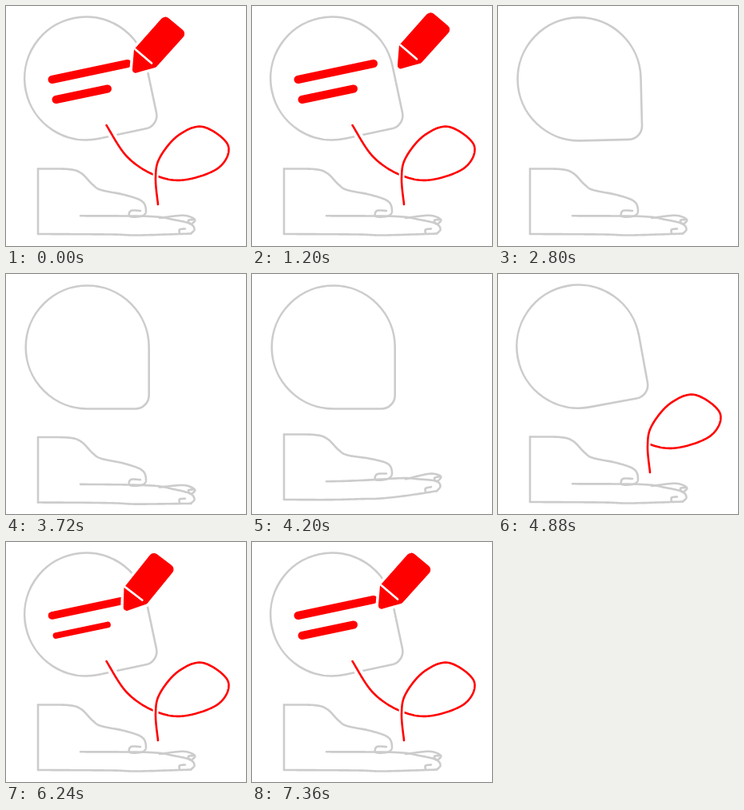
An HTML page with a canvas for the animation above (7400 ms loop, 300 by 300 pixels).

```html
<!DOCTYPE html>
<html lang="en">
<head>
<meta charset="utf-8">
<title>Balloon note</title>
<style>
html, body { margin: 0; width: 100%; height: 100%; overflow: hidden; background: #fff; }
canvas { display: block; width: 300px; height: 300px; }
</style>
</head>
<body>
<canvas id="stage"></canvas>
<script>
const LOOP = 7400, GRAY = '#ccc', RED = '#f00';
const stage = document.getElementById('stage');
const c = stage.getContext('2d');
const dpr = window.devicePixelRatio || 1;
stage.width = stage.height = 300 * dpr;

const span = (t, a, b) => Math.min(1, Math.max(0, (t - a) / (b - a)));
const smooth = p => p * p * (3 - 2 * p);
const easeOut = p => 1 - (1 - p) ** 3;
const inOut = p => p < .5 ? 4 * p ** 3 : 1 - 4 * (1 - p) ** 3;
const hump = p => Math.sin(Math.PI * p);
const mix = (a, b, p) => a.map((v, i) => v + (b[i] - v) * p);

// Smooth curve through the given points (Catmull-Rom), sampled evenly.
const STEPS = 24;
function spline(points) {
  const at = i => points[Math.min(points.length - 1, Math.max(0, i))];
  return Array.from({ length: (points.length - 1) * STEPS + 1 }, (_, n) => {
    const i = Math.floor(n / STEPS), p = n % STEPS / STEPS;
    return [0, 1].map(k => {
      const [a, b, d, e] = [-1, 0, 1, 2].map(o => at(i + o)[k]);
      return b + p / 2 * (d - a + p * (2 * a - 5 * b + 4 * d - e + p * (3 * (b - d) + e - a)));
    });
  });
}

function trace(points) {
  c.beginPath();
  points.forEach(p => c.lineTo(...p));
}

function stroke(color, width, path) {
  c.strokeStyle = color;
  c.lineWidth = width;
  path ? c.stroke(path) : c.stroke();
}

function drawBubble(t) {
  const turn = inOut(span(t, 4380, 5120)) + 1 - inOut(span(t, 2180, 3080));
  c.save();
  c.translate(101.7 - 1.5 * turn, 91.5 - turn);
  c.rotate(-12 * turn * Math.PI / 180);
  c.beginPath();
  c.roundRect(-77, -77, 154, 154, [77, 77, 17, 77]);
  stroke(GRAY, 2.6);
  c.restore();
}

// The pencil starts at WRITE and takes one BEAT for every move.
const WRITE = 5560, BEAT = 136;
const lines = [
  { from: [57.5, 92], to: [152, 72], start: WRITE + BEAT, erase: LOOP + 1500 },
  { from: [62.5, 117], to: [127, 103.5], start: WRITE + 3 * BEAT, erase: LOOP + 1310 }
];

function drawLine({ from, to, start, erase }, u) {
  const part = span(u, start, start + BEAT) - span(u, erase, erase + 200);
  if (part <= 0) return;
  trace([from, mix(from, to, part)]);
  stroke(RED, 6 + 4 * span(u, start, start + 600));
}

const cord = spline([[125.5, 149], [151, 188], [185, 211], [222, 217.5], [266, 202],
  [277.5, 174], [246, 151], [215, 162], [192, 190], [187, 215], [190, 248]]);
const CORD_TOP = 6 * STEPS;

function drawCord(from, to, halo) {
  if (to - from < 2) return;
  trace(cord.slice(from, to));
  c.lineCap = 'butt';
  stroke('#fff', halo);
  c.lineCap = 'round';
  stroke(RED, 2.6);
}

function drawString(t) {
  const n = cord.length;
  const gone = smooth(span(t, 1780, 2440)), back = smooth(span(t, 4480, 5040));
  const from = t > 3000 ? Math.round(n * (1 - back)) : 0;
  const to = t > 3000 ? n : Math.round(n * (1 - gone));
  drawCord(from, Math.min(to, CORD_TOP), 10);
  drawCord(Math.max(from, CORD_TOP - 1), to, 7);
}

function rounded(points) {
  const path = new Path2D(), n = points.length;
  path.moveTo(...mix(points[0], points[n - 1], .5).slice(0, 2));
  points.forEach(([x, y, r], i) => {
    const [nx, ny] = points[(i + 1) % n];
    path.arcTo(x, y, nx, ny, r);
  });
  path.closePath();
  return path;
}

// Relative to the tip, each corner with its radius.
const pencil = rounded([[-1, 2, 4], [1.5, -28.5, 3], [40, -72, 6.5], [67.5, -49, 6.5], [29, -6.5, 4]]);
const route = [[58.5, 106], ...lines.flatMap(l => [l.from, l.to]), [147.5, 85.5]];

function drawPencil(u) {
  const size = span(u, 5400, 5576) - span(u, LOOP + 1240, LOOP + 1460);
  if (size < .01) return;
  const last = route.length - 1, done = WRITE + last * BEAT;
  const pos = last * span(u, WRITE, done), leg = Math.min(last - 1, Math.floor(pos));
  const [x, y] = mix(route[leg], route[leg + 1], pos - leg);
  const settle = easeOut(span(u, done, done + 900));
  const drift = 11 * settle + 24 * smooth(span(u, LOOP + 40, LOOP + 1240));
  c.save();
  c.translate(x + drift, y - drift * .22);
  c.rotate(-3 * (1 - settle) * Math.PI / 180);
  c.scale(size, size);
  stroke('#fff', 7, pencil);
  c.fillStyle = RED;
  c.fill(pencil);
  trace([[3, -29], [23.5, -11.5]]);
  stroke('#fff', 2.6);
  c.restore();
}

const hand = [
  [[40, 285], [40, 203.5]],
  spline([[40, 203.5], [78, 204], [94, 209], [108, 223], [119, 230], [148, 236],
    [170, 244], [175, 256], [170, 262.5], [155, 263], [156, 256], [168, 256]]),
  spline([[93, 262.3], [180, 263], [209, 267], [230, 272], [235.5, 279], [231, 284.5]]),
  spline([[40, 285], [130, 285.5], [165, 286.5], [231, 284.5]]),
  spline([[217, 284], [217, 279.5], [224, 278.5]]),
  spline([[192, 265], [222, 261.8], [236, 267], [231, 272.5], [228, 268], [234, 267]])
];

function drawHand(t) {
  const lift = smooth(span(t, 3700, 4060)) - smooth(span(t, 4360, 4640))
    - .2 * (hump(span(t, 3600, 3800)) + hump(span(t, 4600, 4840)));
  const raise = ([x, y]) => [x, y - lift * (3 + 9.5 * (Math.max(0, x - 80) / 145) ** 2)];
  hand.forEach(points => {
    trace(points.map(raise));
    stroke(GRAY, 2.6);
  });
}

function draw(now) {
  const t = now % LOOP;
  const u = t < 3000 ? t + LOOP : t; // keeps the writing continuous across the loop
  c.setTransform(dpr, 0, 0, dpr, 0, 0);
  c.fillStyle = '#fff';
  c.fillRect(0, 0, 300, 300);
  c.lineCap = c.lineJoin = 'round';
  drawBubble(t);
  lines.forEach(line => drawLine(line, u));
  drawString(t);
  drawPencil(u);
  drawHand(t);
}

let start;
function frame(now) {
  start ??= now;
  draw(now - start);
  requestAnimationFrame(frame);
}
draw(0);
requestAnimationFrame(frame);
</script>
</body>
</html>
```
